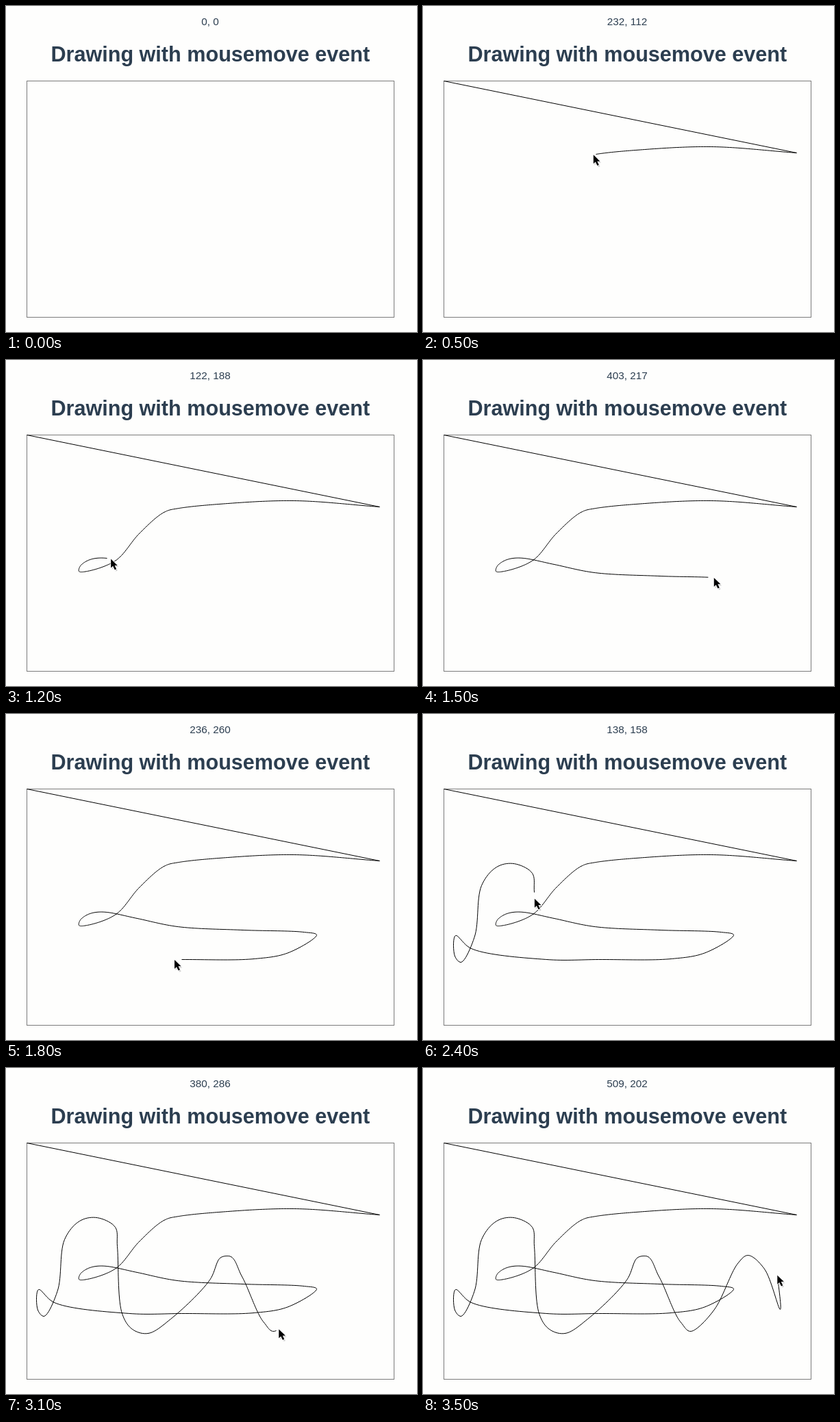
An HTML page for the animation above (3.6 s loop, 600 px wide and 476 px high).

```html
<!DOCTYPE html>
<html lang="en">
<head>
<meta charset="utf-8">
<title>Drawing with mousemove event</title>
<style>
  html, body { margin: 0; width: 100%; height: 100%; overflow: hidden; background: #fefefd; }
  svg { display: block; }
  text { font-family: "Liberation Sans", Arial, sans-serif; fill: #2c3e50; text-anchor: middle; }
</style>
</head>
<body>
<svg width="600" height="476" viewBox="0 0 600 476">
  <text id="label" x="298" y="28" font-size="15.3"></text>
  <text x="298.3" y="80.6" font-size="30.6" font-weight="bold">Drawing with mousemove event</text>
  <rect x="30.5" y="109.5" width="536" height="345" fill="none" stroke="#7b7b7b"/>
  <polyline id="line" fill="none" stroke="#000" transform="translate(.5 .5)"/>
  <g id="cursor">
    <path d="M2 3v13l3-2.8 2.6 5.4 2.4-1-2.5-5.3h4.1z" fill="#999" opacity=".45"/>
    <path d="M.3 .8v13l3-2.8 2.6 5.4 2.4-1-2.5-5.3h4.1z" fill="#000" stroke="#fff" stroke-width="1.4" paint-order="stroke"/>
  </g>
</svg>
<script>
const LOOP = 3600, STEP = 100, START = 80, LEAD = 10, SAMPLE = 5;
const LEFT = 30, TOP = 109, SCALE = 1.045;

// Key points of the gesture; each stroke is filed under the time it ends.
const strokes = {
  500: "545,214 420,205 310,210 252,216",
  1200: "230,222 194,253 160,292 118,308 106,308 110,298 147,289",
  1800: "191,298 250,310 345,315 434,318 453,322 412,348 362,357 256,358",
  2400: "180,358 70,342 47,323 46,353 55,362 75,324 85,250 107,223 132,218 159,232 162,260",
  2800: "169,358 184,381 207,387 240,366 297,309 312,277 324,274",
  3100: "344,304 376,371 394,383",
  3500: "425,352 459,285 474,273 498,293 521,352 517,302"
};

// Within a stroke, the time between points grows with the root of their distance.
const knots = [];
let begin = START;
for (const [end, list] of Object.entries(strokes)) {
  let prev = knots.at(-1), sum = 0;
  const part = list.split(" ").map(pair => {
    const [x, y] = pair.split(",").map(Number);
    if (prev) sum += Math.sqrt(Math.hypot(x - prev.x, y - prev.y));
    return prev = { x, y, sum };
  });
  for (const p of part) knots.push({ x: p.x, y: p.y, t: begin + (end - begin) * p.sum / sum });
  begin = +end;
}

const slope = (a, b, axis) => (b[axis] - a[axis]) / (b.t - a.t);

function velocity(i, axis) {
  const a = knots[i - 1], k = knots[i], b = knots[i + 1];
  if (!a) return slope(k, b, axis);
  if (!b) return slope(a, k, axis);
  return (slope(a, k, axis) * (b.t - k.t) + slope(k, b, axis) * (k.t - a.t)) / (b.t - a.t);
}

// Smooth curve through the knots (cubic Hermite).
function pointAt(t) {
  const i = knots.findIndex(k => k.t > t);
  if (i < 0) return knots.at(-1);
  const a = knots[i - 1], b = knots[i], h = b.t - a.t, u = (t - a.t) / h, w = 1 - u;
  const along = axis =>
    w * w * ((1 + 2 * u) * a[axis] + u * h * velocity(i - 1, axis)) +
    u * u * ((1 + 2 * w) * b[axis] - w * h * velocity(i, axis));
  return { x: along("x"), y: along("y") };
}

const [label, line, cursor] = ["label", "line", "cursor"].map(id => document.getElementById(id));

function draw(t) {
  const active = t >= START;
  const path = [];
  let pen = { x: LEFT, y: TOP };
  if (active) {
    path.push(pen);
    for (let s = START; s < t; s += SAMPLE) path.push(pointAt(s));
    path.push(pen = pointAt(t));
    const tip = pointAt(t + LEAD);
    cursor.setAttribute("transform", `translate(${tip.x} ${tip.y})`);
  }
  cursor.style.display = active ? "" : "none";
  line.setAttribute("points", path.map(p => p.x + "," + p.y).join(" "));
  label.textContent = [pen.x - LEFT, pen.y - TOP].map(v => Math.round(v * SCALE)).join(", ");
}

const t0 = performance.now();
function tick() {
  const t = (performance.now() - t0) % LOOP;
  draw(Math.floor(t / STEP) * STEP);
  requestAnimationFrame(tick);
}
tick();
</script>
</body>
</html>
```
